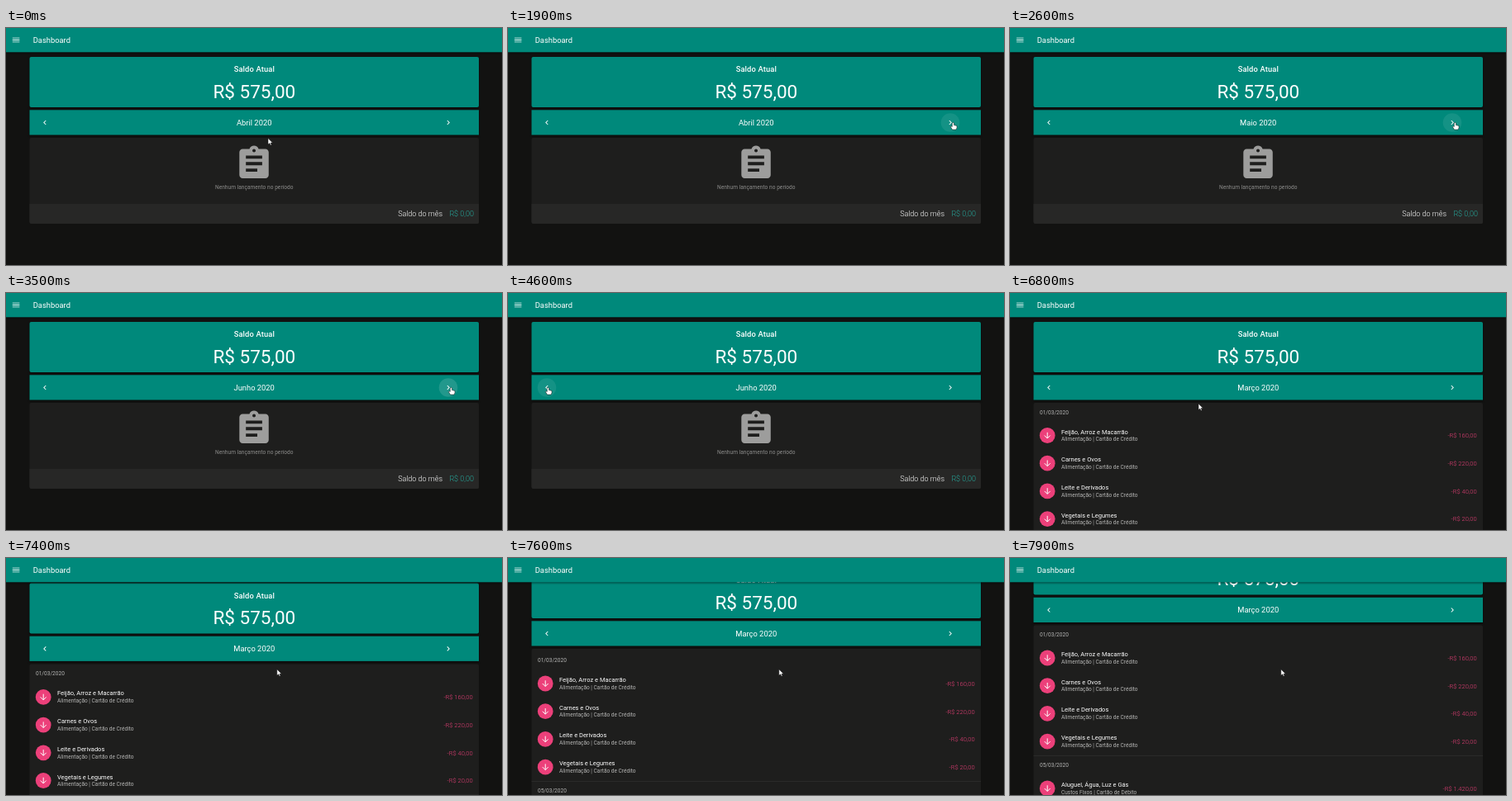
An HTML page that plays this animation: 600x287 px, repeating every 8 s.

```html
<!DOCTYPE html>
<html lang="pt">
<head>
<meta charset="utf-8">
<style>
html, body { margin: 0; width: 100%; height: 100%; overflow: hidden; background: #121211; }
svg { display: block; width: 600px; height: 287px; font-family: Roboto, sans-serif; fill: #fff; }
.mid { text-anchor: middle; }
.end { text-anchor: end; }
.big { font-size: 9.375px; }
.small { font-size: 6.56px; }
.dim { fill: #b4b4b3; }
.teal { fill: #00897b; }
.card { fill: #1e1e1d; }
.light { font-weight: 300; }
.shade { filter: drop-shadow(0 1px 1px #0008); }
</style>
</head>
<body>
<svg viewBox="0 0 600 287">
  <g id="head">
    <g class="teal shade">
      <rect x="28.5" y="35" width="543.5" height="61" rx="2"/>
      <rect x="28.5" y="99.3" width="543.5" height="30.2"/>
    </g>
    <text class="mid big" x="300.3" y="53.2" font-weight="500" letter-spacing=".117">Saldo Atual</text>
    <text class="mid" x="300.3" y="84.8" font-size="22.5">R$ 575,00</text>
    <text class="mid big" id="month" x="300.2" y="117.8"></text>
    <circle id="hover" cy="114.5" r="11.3"/>
    <circle id="ripple" cy="114.5"/>
    <path transform="translate(41.4 108.9) scale(.469)" d="M15.4 7.4L14 6l-6 6 6 6 1.4-1.4L10.8 12z"/>
    <path transform="translate(529.4 108.9) scale(.469)" d="M10 6L8.6 7.4l4.6 4.6-4.6 4.6L10 18l6-6z"/>
    <rect id="panel" class="card" x="28.5" y="133" width="543.5" rx="2"/>
  </g>
  <g id="empty">
    <path fill="#272726" d="M28.5 213H572V235q0 2-2 2H30.5q-2 0-2-2z"/>
    <path fill="#9d9d9c" transform="translate(276.4 140.6) scale(1.97)" d="M19 3h-4.18C14.4 1.84 13.3 1 12 1c-1.3 0-2.4.84-2.82 2H5c-1.1 0-2 .9-2 2v14c0 1.1.9 2 2 2h14c1.1 0 2-.9 2-2V5c0-1.1-.9-2-2-2zm-7 0c.55 0 1 .45 1 1s-.45 1-1 1-1-.45-1-1 .45-1 1-1zm2 14H7v-2h7v2zm3-4H7v-2h10v2zm0-4H7V7h10v2z"/>
    <text class="mid small" x="300.3" y="194.8" fill="#8c8c8b" letter-spacing=".04">Nenhum lançamento no período</text>
    <text class="end light" x="528" y="228.3" font-size="9">Saldo do mês</text>
    <text class="end light" x="566" y="228.3" font-size="9" fill="#26a69a">R$ 0,00</text>
  </g>
  <g id="list"></g>
  <g>
    <rect class="teal shade" width="600" height="29.3"/>
    <path transform="translate(6.4 8.8) scale(.475)" d="M3 18h18v-2H3zm0-5h18v-2H3zm0-7v2h18V6z"/>
    <text class="big" x="32.7" y="18">Dashboard</text>
  </g>
  <g id="cursor" stroke="#111" stroke-width=".5">
    <path id="arrow" d="M0 0V7.6L1.8 6L3 8.6L4.2 8L3.1 5.6H5.5Z"/>
    <path id="hand" d="M-1.2 .6Q0-.6 1 .6V3.2L4.5 4V6.5L3.5 8.7H-1L-3.2 5.2Q-2.7 4-1.2 5Z"/>
  </g>
</svg>
<script>
const LOOP = 8000, STEP = 100;
const $ = id => document.getElementById(id);
const head = $('head'), month = $('month'), hover = $('hover'), ripple = $('ripple'), panel = $('panel'),
  empty = $('empty'), list = $('list'), cursor = $('cursor'), arrow = $('arrow'), hand = $('hand');

const groups = [
  ['01/03/2020', [
    ['Feijão, Arroz e Macarrão', '160,00'], ['Carnes e Ovos', '220,00'],
    ['Leite e Derivados', '40,00'], ['Vegetais e Legumes', '20,00']
  ], 'Alimentação | Cartão de Crédito'],
  ['05/03/2020', [['Aluguel, Água, Luz e Gás', '1.420,00']], 'Custos Fixos | Cartão de Débito']
];

const row = (y, title, note, value) => `<g transform="translate(0 ${y})">
  <circle cx="45.2" r="9.4" fill="#ec407a"/>
  <path d="M45.2-3.7V3.3M41.7 0L45.2 3.5L48.7 0" fill="none" stroke="#fff"/>
  <text x="62" y="-2" font-size="7.5">${title}</text>
  <text class="small dim" x="62" y="6.8">${note}</text>
  <text class="end light" x="564.6" y="2.8" font-size="7.5" fill="#ec407a">-R$ ${value}</text></g>`;

list.innerHTML = groups.map(([date, rows, note], g) => {
  const top = 144 + g * 158;
  const line = g ? `<path d="M28.5 ${top - 11}H572" stroke="#333332" stroke-width=".6"/>` : '';
  return line + `<text class="small dim" x="36" y="${top + 2.6}">${date}</text>` +
    rows.map(([title, value], i) => row(top + 28.5 + i * 33.7, title, note, value)).join('');
}).join('');

// Keys are [time, ...values]; values run linearly between them.
const cursorKeys = [
  [0, 317, 133.5], [100, 310, 118], [200, 302, 106], [300, 302, 106], [400, 309, 108], [600, 309, 108],
  [700, 306, 111], [900, 302, 109], [1300, 302, 109], [1400, 330, 112], [1700, 546, 114], [1900, 538.5, 114.4],
  [3600, 538.5, 114.4], [3900, 210, 121], [4300, 48.5, 114.4], [6500, 48.5, 114.4], [6800, 228, 134],
  [7000, 310, 134], [7200, 327.8, 134.7]
];
const scrollKeys = [[7350, 0, 0], [7600, 23, 20.5], [7900, 51.5, 51.5]];
const months = [[0, 'Abril'], [2200, 'Maio'], [3200, 'Junho'], [4900, 'Maio'], [5400, 'Abril'], [5900, 'Março']];
const clicks = [2100, 3100, 4800, 5300, 5800];
const LIST_TIME = 6000;

function sample(keys, t) {
  const i = keys.findIndex(k => k[0] > t);
  if (i === 0) return keys[0].slice(1);
  if (i < 0) return keys[keys.length - 1].slice(1);
  const a = keys[i - 1], b = keys[i], p = (t - a[0]) / (b[0] - a[0]);
  return a.slice(1).map((v, n) => v + (b[n + 1] - v) * p);
}

function draw(t) {
  const [x, y] = sample(cursorKeys, t), [headScroll, listScroll] = sample(scrollKeys, t);
  head.setAttribute('transform', `translate(0 ${-headScroll})`);
  list.setAttribute('transform', `translate(0 ${-listScroll})`);
  month.textContent = months.filter(m => m[0] <= t).pop()[1] + ' 2020';

  const loaded = t >= LIST_TIME;
  list.style.display = loaded ? '' : 'none';
  empty.style.display = loaded ? 'none' : '';
  panel.setAttribute('height', loaded ? 400 : 104);

  const over = x < 59 || Math.abs(x - 535) < 12;
  arrow.style.display = over ? 'none' : '';
  hand.style.display = over ? '' : 'none';
  cursor.setAttribute('transform', `translate(${x} ${y})`);

  const center = x < 300 ? 47 : 535;
  const since = t - (clicks.filter(c => c <= t).pop() ?? -LOOP);
  hover.setAttribute('cx', center);
  hover.setAttribute('opacity', over ? .08 : 0);
  ripple.setAttribute('cx', center);
  ripple.setAttribute('r', 11.3 * Math.min(1, .4 + since / 300));
  ripple.setAttribute('opacity', over ? .19 * Math.max(0, Math.min(1, (500 - since) / 300)) : 0);
}

function tick() {
  draw(Math.floor(performance.now() % LOOP / STEP) * STEP);
  requestAnimationFrame(tick);
}
tick();
</script>
</body>
</html>
```
